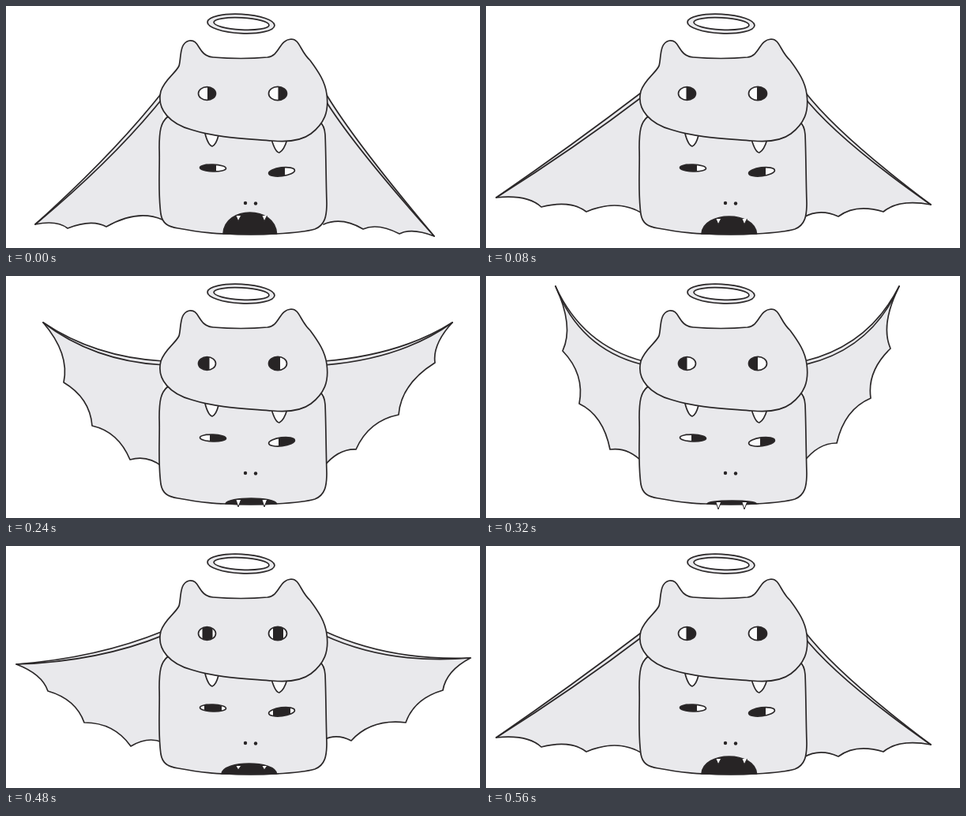
Recreate the animation shown at these times as an HTML page. Size 600x307 px, loop 640 ms.

```html
<!DOCTYPE html>
<html lang="en">
<head>
<meta charset="utf-8">
<title>Winged creature</title>
<style>
  html, body { margin: 0; width: 100%; height: 100%; overflow: hidden; background: #fff; }
  svg { display: block; width: 100%; height: 100%; }
  .ink { fill: none; stroke: #2b2829; stroke-width: 1.7; stroke-linecap: round; stroke-linejoin: round; }
  .skin { fill: #e9e9ec; }
  .white { fill: #fbfbfc; }
  .dark { fill: #272425; }

  .pose { visibility: hidden; animation: 640ms step-end infinite; }
  .low { animation-name: low; }
  .lower-mid { animation-name: lower-mid; }
  .level { animation-name: level; }
  .raised { animation-name: raised; }
  .top { animation-name: top; }
  @keyframes low { 0% { visibility: visible } 12.5%, 100% { visibility: hidden } }
  @keyframes lower-mid { 0%, 25% { visibility: hidden } 12.5%, 87.5%, 100% { visibility: visible } }
  @keyframes level { 0%, 37.5%, 87.5%, 100% { visibility: hidden } 25%, 75% { visibility: visible } }
  @keyframes raised { 0%, 50%, 75%, 100% { visibility: hidden } 37.5%, 62.5% { visibility: visible } }
  @keyframes top { 0%, 62.5%, 100% { visibility: hidden } 50% { visibility: visible } }
</style>
</head>
<body>
<svg viewBox="0 0 600 307" preserveAspectRatio="none">
  <defs id="clips"></defs>
  <g id="wings"></g>
  <g class="ink">
    <ellipse class="skin" cx="297.5" cy="22.5" rx="42.5" ry="12.2" transform="rotate(3 297.5 22.5)"/>
    <ellipse cx="298" cy="22.5" rx="35" ry="7.6" fill="#fff" transform="rotate(3 298 22.5)"/>
    <path class="skin" d="M204 141C196 148 194 158 194 180C195 205 192 235 196 264C198 276 205 280 218 282C240 286 258 289 278 289Q310 291 342 289C360 288 378 287 391 283C404 278 406 266 406 250C405 220 405 185 404 163Q403 151 397 147Z"/>
    <path class="white" d="M252 162Q256 177 261 178Q266 176 269 164M336 169Q341 186 346 186Q352 183 356 169"/>
    <path class="skin" d="M196 108C201 93 214 86 219 76C222 66 219 47 232 44C246 42 242 63 262 65Q298 68 331 65C347 63 345 43 361 42C372 42 372 57 385 69C396 84 404 96 406 112C409 134 403 149 386 162C374 171 358 173 337 171C301 168 266 167 235 157C209 150 190 132 196 108Z"/>
  </g>
  <circle class="dark" cx="303" cy="250" r="2.2"/>
  <circle class="dark" cx="316" cy="250.5" r="2.2"/>
  <g id="faces"></g>
  <g id="lids" class="ink"></g>
</svg>
<script>
const eyes = [
  { x: 254.5, y: 111, rx: 11, ry: 8.3, tilt: 0, upper: true },
  { x: 344, y: 111, rx: 11.5, ry: 8.7, tilt: 0, upper: true },
  { x: 262, y: 205.5, rx: 16.5, ry: 4.4, tilt: 2 },
  { x: 349, y: 210.3, rx: 16.5, ry: 5.4, tilt: -7 }
];

// Wings list: bone bend, tip, scallop corners, body edge.
const poses = [
  { name: 'low', left: '136,188 37,277 78,282 127,280 198,271', right: '438,168 542,292 498,289 452,283 402,277',
    upper: [0.5, 14], lower: [-18, 4], mouth: [275, 262], fangs: [266, 7] },
  { name: 'lower-mid', left: '110,176 13,243 70,255 127,261 198,263', right: '446,164 563,252 503,261 446,267 402,268',
    upper: [-1, 14], lower: [-18, 5], mouth: [273, 267], fangs: [270, 7] },
  { name: 'level', left: '116,142 13,150 53,184 99,224 158,254 198,249', right: '485,146 588,142 553,183 506,224 437,247 402,246',
    upper: [-6, 7], lower: [-11, 11], mouth: [273, 276], fangs: [279, 5] },
  { name: 'raised', left: '112,103 47,59 73,135 109,190 157,233 198,242', right: '500,100 565,59 543,110 497,176 443,220 402,242',
    upper: [-14, 3], lower: [-4, 18], mouth: [278, 282], fangs: [284, 9] },
  { name: 'top', left: '122,88 88,13 97,95 118,162 157,220 198,236', right: '485,88 523,13 512,92 487,155 444,212 402,236',
    upper: [-14, 0], lower: [-2, 18], mouth: [280, 285], fangs: [287, 9] }
];

function wing(shoulder, text) {
  const [bend, tip, ...corners] = text.split(' ').map(pair => pair.split(',').map(Number));
  const dx = tip[0] - shoulder[0], dy = tip[1] - shoulder[1];
  const scale = 5 / Math.hypot(dx, dy) * Math.sign(dx);
  const inset = ([x, y]) => [x - dy * scale, y + dx * scale];
  let edge = '', from = tip;
  for (const to of corners) {
    const mid = [(from[0] + to[0]) / 2, (from[1] + to[1]) / 2];
    const toward = [shoulder[0] - mid[0], shoulder[1] - mid[1]];
    const push = 0.26 * Math.hypot(to[0] - from[0], to[1] - from[1]) / Math.hypot(...toward);
    edge += `Q${mid[0] + toward[0] * push} ${mid[1] + toward[1] * push} ${to}`;
    from = to;
  }
  return `<path class="skin" d="M${shoulder}Q${bend} ${tip}${edge}"/>
    <path d="M${inset(shoulder)}Q${inset(bend)} ${tip}"/>`;
}

function mouth({ mouth: [left, peak], fangs: [y, h] }) {
  const lift = 289 - (289 - peak) * 4 / 3, right = 342.5;
  const fang = x => `<path class="white" stroke-width="1" d="M${x - 3} ${y}L${x} ${y + h}L${x + 3.5} ${y}"/>`;
  return `<path class="ink dark" style="fill:#272425" d="M${left} 289C${left + 2} ${lift} ${right - 2} ${lift} ${right} 289Q310 290 ${left} 289Z"/>
    <g fill="none" stroke="#272425">${fang(294)}${fang(327)}</g>`;
}

const oval = e => `<ellipse cx="${e.x}" cy="${e.y}" rx="${e.rx}" ry="${e.ry}" transform="rotate(${e.tilt} ${e.x} ${e.y})"/>`;

function pupil(eye, i, pose) {
  const [a, b] = eye.upper ? pose.upper : pose.lower;
  return `<rect class="dark" clip-path="url(#eye${i})" x="${eye.x + a}" y="${eye.y - 12}" width="${b - a}" height="24"/>`;
}

const fill = (id, html) => { document.getElementById(id).innerHTML = html; };
const eachPose = draw => poses.map(p => `<g class="pose ${p.name}">${draw(p)}</g>`).join('');

fill('clips', eyes.map((e, i) => `<clipPath id="eye${i}">${oval(e)}</clipPath>`).join(''));
fill('wings', eachPose(p => `<g class="ink">${wing([199, 108], p.left)}${wing([403, 108], p.right)}</g>`));
fill('faces', `<g class="white">${eyes.map(oval).join('')}</g>` +
  eachPose(p => mouth(p) + eyes.map((e, i) => pupil(e, i, p)).join('')));
fill('lids', eyes.map(oval).join(''));
</script>
</body>
</html>
```
